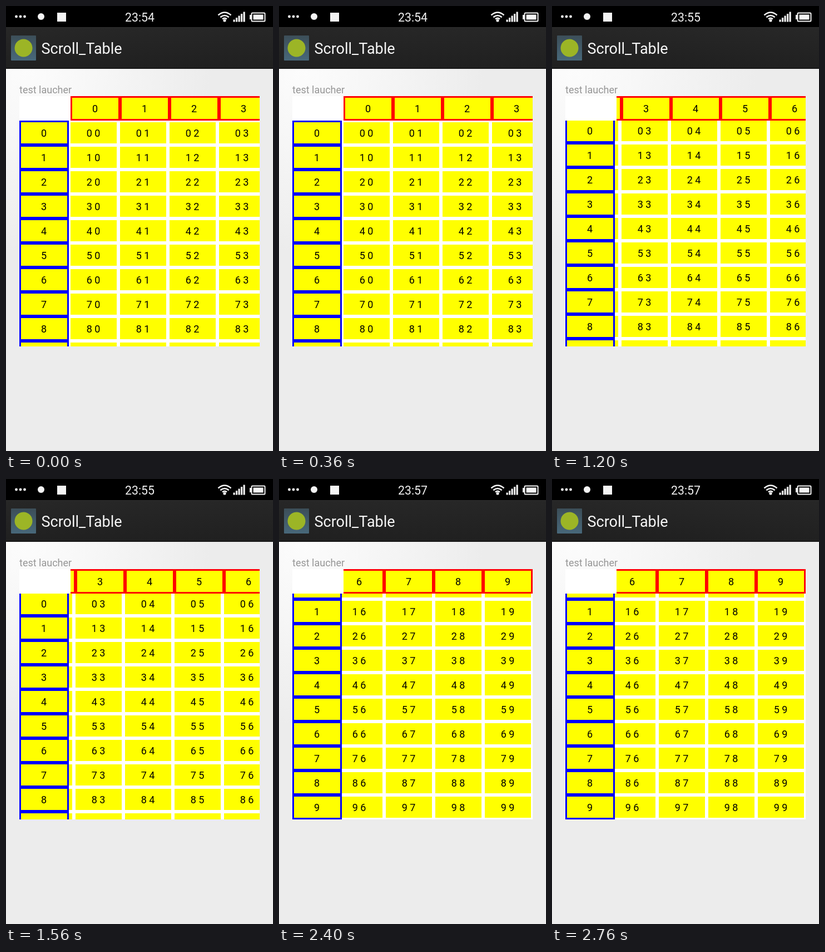
An HTML page that plays this animation: 480 by 800 pixels, repeating every 3 s.

```html
<!DOCTYPE html>
<html lang="en">
<head>
<meta charset="utf-8">
<title>Scroll table</title>
<style>
  html, body { margin: 0; width: 100%; height: 100%; overflow: hidden; background: #ececec; }
  svg { display: block; width: 480px; height: 800px; font-family: Roboto, sans-serif; }
  .cell { font-size: 18px; text-anchor: middle; }
</style>
</head>
<body>
<svg viewBox="0 0 480 800">
  <defs>
    <radialGradient id="glow" gradientUnits="userSpaceOnUse" cx="40" cy="113" r="330">
      <stop offset="0" stop-color="#fcfcfc"/>
      <stop offset=".35" stop-color="#f7f7f7"/>
      <stop offset="1" stop-color="#ececec"/>
    </radialGradient>
    <linearGradient id="bar" x2="0" y2="1">
      <stop offset="0" stop-color="#272727"/>
      <stop offset="1" stop-color="#202020"/>
    </linearGradient>
    <linearGradient id="tile" x2="0" y2="1">
      <stop offset="0" stop-color="#3c4e58"/>
      <stop offset="1" stop-color="#48687a"/>
    </linearGradient>
    <clipPath id="headClip"><rect x="116" y="162" width="340" height="44"/></clipPath>
    <clipPath id="sideClip"><rect x="24" y="206" width="89" height="406"/></clipPath>
    <clipPath id="bodyClip"><rect x="113" y="206" width="343" height="406"/></clipPath>
  </defs>

  <rect width="480" height="800" fill="#ececec"/>
  <rect y="113" width="480" height="687" fill="url(#glow)"/>

  <!-- status bar -->
  <rect width="480" height="38" fill="#000"/>
  <g fill="#f4f4f4">
    <circle cx="18.5" cy="19" r="2.4"/>
    <circle cx="26" cy="19" r="2.4"/>
    <circle cx="33.5" cy="19" r="2.4"/>
    <circle cx="63" cy="19" r="6"/>
    <rect x="92" y="12" width="16" height="16"/>
    <circle cx="393" cy="26" r="2.6"/>
    <g id="bars"></g>
    <rect x="438" y="16" width="3" height="8"/>
    <rect x="444.5" y="15.5" width="18" height="9"/>
  </g>
  <g fill="none" stroke="#f4f4f4">
    <path d="M381.5 16.5Q393 6.5 404.500 16.500M385.300 20.300Q393 13.700 400.700 20.300M389 23.500Q393 20.200 397 23.500" stroke-width="2.6"/>
    <rect x="441.500" y="12.500" width="24" height="15" rx="1.500" stroke-width="2"/>
  </g>
  <text id="clock" x="240.5" y="28" font-size="21.3" text-anchor="middle" fill="#f0f0f0"></text>

  <!-- title bar -->
  <rect y="38" width="480" height="75" fill="url(#bar)"/>
  <rect y="38" width="480" height="1" fill="#303030"/>
  <rect y="111" width="480" height="2" fill="#171717"/>
  <rect x="9" y="53" width="45" height="45" rx="1" fill="url(#tile)"/>
  <circle cx="31.500" cy="75.500" r="16" fill="#9cb526"/>
  <text x="63.500" y="86" font-size="27" fill="#f5f5f5">Scroll_Table</text>

  <!-- table -->
  <text x="24" y="157" font-size="18" fill="#969696">test laucher</text>
  <rect x="24" y="162" width="432" height="450" fill="#fff"/>
  <g clip-path="url(#bodyClip)"><g id="body"></g></g>
  <g clip-path="url(#sideClip)"><g id="side"></g></g>
  <g clip-path="url(#headClip)"><g id="head"></g></g>
</svg>

<script>
const NS = "http://www.w3.org/2000/svg";
const $ = id => document.getElementById(id);
const W = 89, H = 44, N = 10, EDGE = 3;
const HOLD = 600;
const MAX_HEAD = N * W - 340, MAX_BODY = N * W - 343;

// Each step: horizontal scroll, vertical scroll, clock minute
const steps = [[0, 0, 54], [60, 0, 54], [258, 4, 55], [414, 0, 56], [550, 34, 57]];

function add(parent, tag, attrs, text) {
  const el = document.createElementNS(NS, tag);
  for (const k in attrs) el.setAttribute(k, attrs[k]);
  if (text !== undefined) el.textContent = text;
  parent.appendChild(el);
}

function cell(parent, x, y, border, label) {
  add(parent, "rect", { x, y, width: W, height: H, fill: border });
  add(parent, "rect", { x: x + EDGE, y: y + EDGE, width: W - 2 * EDGE, height: H - 2 * EDGE, fill: "#ff0" });
  add(parent, "text", { x: x + W / 2 - 0.5, y: y + 29, class: "cell" }, label);
}

for (let i = 0; i < N; i++) {
  cell($("head"), 116 + i * W, 162, "#f00", i);
  cell($("side"), 24, 206 + i * H, "#00f", i);
  for (let j = 0; j < N; j++) cell($("body"), 113 + j * W, 206 + i * H, "#fff", i + " " + j);
}

for (let i = 0; i < 5; i++) {
  const h = 4 + i * 3.5;
  add($("bars"), "rect", { x: 408.5 + i * 4.5, y: 28.5 - h, width: 3.2, height: h });
}

const move = (id, x, y) => $(id).setAttribute("transform", `translate(${-x} ${-y})`);
let last = -1;

function draw(ms) {
  const k = Math.floor(ms / HOLD) % steps.length;
  if (k !== last) {
    const [x, y, min] = steps[k];
    move("head", Math.min(x, MAX_HEAD), 0);
    move("body", Math.min(x, MAX_BODY), y);
    move("side", 0, y);
    $("clock").textContent = "23:" + min;
    last = k;
  }
}

function tick() {
  draw(performance.now());
  requestAnimationFrame(tick);
}
tick();
</script>
</body>
</html>
```
